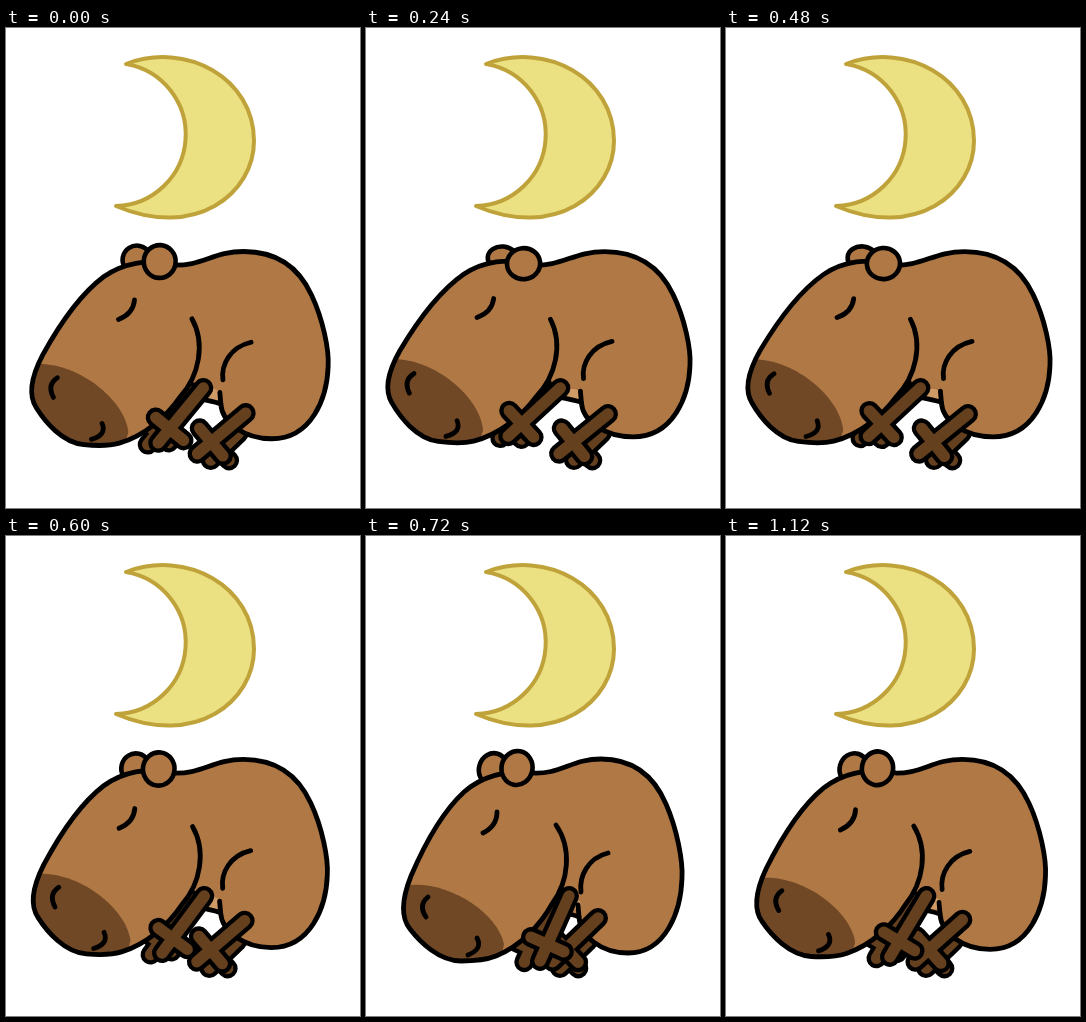
Recreate the animation shown at these times as an HTML page with a canvas. Size 354x480 px, loop 1160 ms.

```html
<!DOCTYPE html>
<html lang="en">
<head>
<meta charset="utf-8">
<title>Sleepy capybara</title>
<style>
html, body { margin: 0; width: 100%; height: 100%; overflow: hidden; background: #fff; }
canvas { display: block; width: 100%; height: 100%; }
</style>
</head>
<body>
<canvas id="stage" width="354" height="480"></canvas>
<script>
const ctx = document.getElementById('stage').getContext('2d');
const LOOP = 1160, STEP = 40;
const FUR = '#b07845', SNOUT = '#704825', LEG = '#64401f', INK = '#000';

// Head lift over time: 0 = nodded down, 1 = fully lifted
const LIFT = [[0, .67], [80, .67], [120, .8], [360, 1], [440, 1],
  [600, .58], [720, 0], [1040, 0], [1080, .38], [LOOP, .38]];

const shape = d => new Path2D(d);

const MOON = shape('M120 36 C180 13 248 50 248 113 C248 165 190 212 110 178 A71.5 71.5 0 0 0 120 36Z');

// Drawn in the nodded-down pose
const HEAD = shape('M168 237 C140 233 115 241 98 256 C74 278 57 312 45 340 C35 365 35 382 44 393 ' +
  'C54 406 73 425 95 425 C108 425 120 424 130 420 C155 410 175 388 186 368 C203 345 206 312 190 289');
const MUZZLE = shape('M30 352 C70 338 130 372 138 408 L134 430 L90 460 L10 440Z');
const FACE = shape('M62 361 Q52 369 60 381 M111 402 Q117 413 102 419 M131 276 Q131 290 117 297');
const BODY = shape('M165 237 C195 239 205 223 235 223 C268 223 288 240 300 268 C311 293 317 325 316 342 ' +
  'C315 375 300 417 262 417 C235 417 214 400 213 381 C204 377 192 377 184 372Z');
const FOLDS = shape('M242 317 C222 322 213 340 215 356 M212 369 L213 381');

function liftAt(time) {
  const i = LIFT.findIndex(([end]) => end > time);
  const [t0, a] = LIFT[i - 1], [t1, b] = LIFT[i];
  return a + (b - a) * (time - t0) / (t1 - t0);
}

function place(path, matrix) {
  const placed = new Path2D();
  placed.addPath(path, matrix);
  return placed;
}

function fill(path, color) {
  ctx.fillStyle = color;
  ctx.fill(path);
}

function ink(path, width = 4.8, color = INK) {
  ctx.lineWidth = width;
  ctx.strokeStyle = color;
  ctx.stroke(path);
}

function oval(x, y, rx, ry, turn) {
  const path = new Path2D();
  path.ellipse(x, y, rx, ry, turn, 0, Math.PI * 2);
  return path;
}

function ear(...size) {
  const path = oval(...size);
  fill(path, FUR);
  ink(path, 4.6);
}

// A straight leg swung from the hip, with three toes crossing at the foot
function leg(x, y, degrees, length, toe) {
  const path = shape(`M0 0 V${length + toe} M${-toe} ${length} H${toe}`);
  const swung = place(path, new DOMMatrix().translate(x, y).rotate(degrees));
  ink(swung, 20);
  ink(swung, 11.4, LEG);
}

function drawBody(sway) {
  const squash = new DOMMatrix().translate(168, 237)
    .scale(1 + .054 * sway, 1 - .045 * sway).translate(-168, -237);
  const body = place(BODY, squash);
  fill(body, FUR);
  fill(oval(206 + 2 * sway, 367, 9, 6, .3), '#cf9a66');
  ink(body);
  ink(place(FOLDS, squash));
}

function drawHead(lift) {
  const tilt = new DOMMatrix().translate(150, 250 - 3 * lift)
    .rotate(8.5 * lift).translate(-150, -250);
  const head = place(HEAD, tilt);
  fill(head, FUR);
  ctx.save();
  ctx.clip(head);
  fill(place(MUZZLE, tilt), SNOUT);
  ctx.restore();
  ink(head);
  ink(place(FACE, tilt));
}

function capybara(lift) {
  const sway = Math.min(1, lift * 1.15);
  const flop = lift ** 3;
  const swing = lift ** 1.4;
  const reach = 24 + 27 * swing;

  leg(222 + 14 * sway, 405, 46, 26, 13);
  drawBody(sway);
  leg(186 - 2 * swing, 364, reach, 53, 15);
  ear(127 + 13 * flop, 233 - 4 * flop, 14 + flop, 16 - 6 * flop, .3 - .3 * flop);
  drawHead(lift);
  ear(151 + 9 * flop, 232 + 5 * flop, 15.5 + 1.5 * flop, 17 - 2 * flop, .2 - .4 * flop);
  leg(232 + 10 * sway, 382 + 4 * sway, 46 + 5 * sway, 45, 18);
  leg(203 - 10 * swing, 360, reach, 53, 18);
}

function draw(now) {
  const time = Math.floor(now % LOOP / STEP) * STEP;
  ctx.fillStyle = '#fff';
  ctx.fillRect(0, 0, 354, 480);
  ctx.lineCap = ctx.lineJoin = 'round';
  fill(MOON, '#ece182');
  ink(MOON, 4, '#bfa33a');
  capybara(liftAt(time));
}

let start;
function tick(now) {
  start ??= now;
  draw(now - start);
  requestAnimationFrame(tick);
}
draw(0);
requestAnimationFrame(tick);
</script>
</body>
</html>
```
